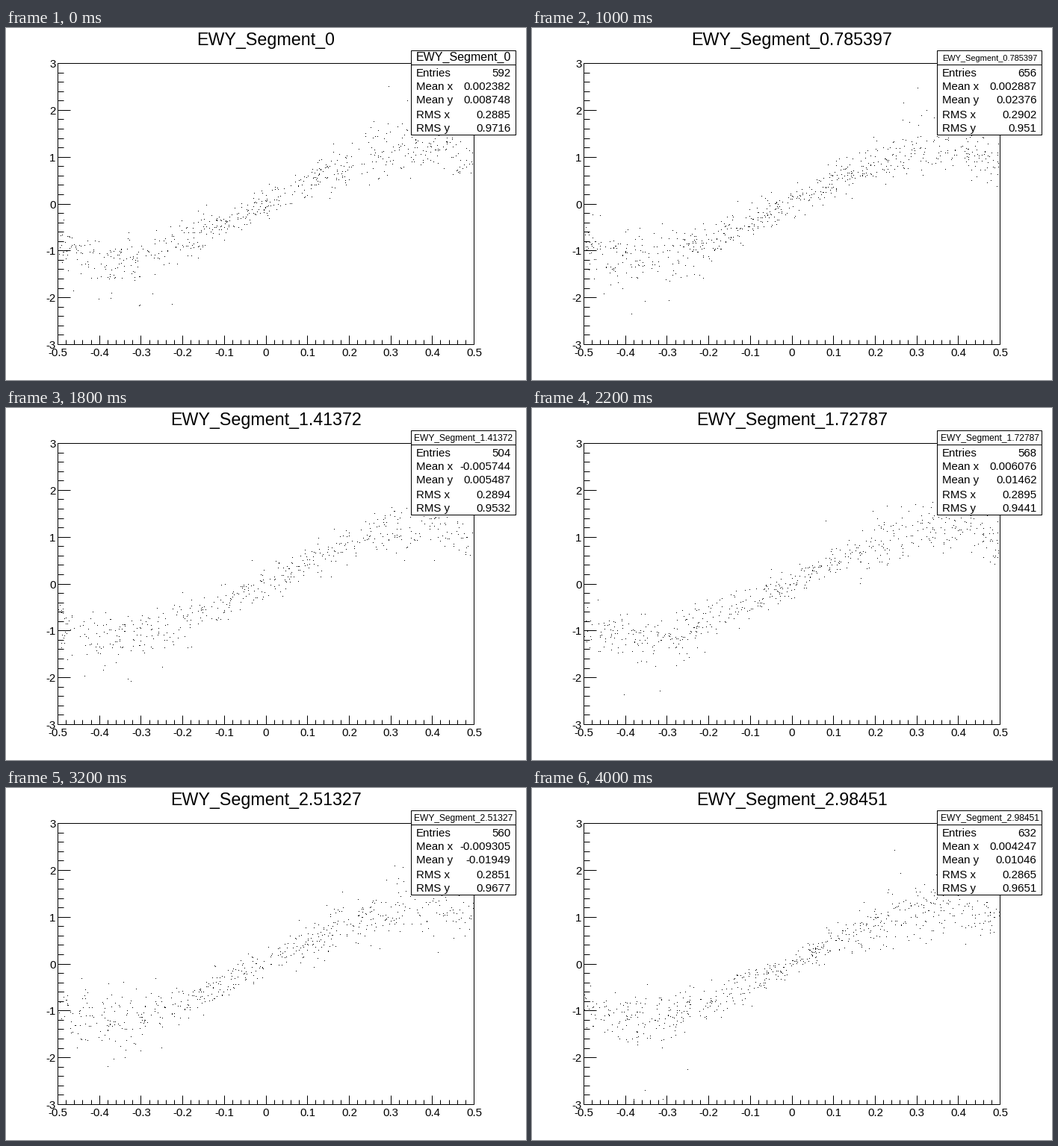
These frames come from a looping animation (696x472 px, 4.1 s). A matplotlib script:

```python
import matplotlib.pyplot as plt
import numpy as np
from matplotlib.animation import FuncAnimation
from matplotlib.patches import Rectangle

W, H, DPI = 696, 472, 64
PX = 72 / DPI  # points per pixel
LEFT, RIGHT, TOP, BOTTOM = 69, 626, 47, 424
SEGMENTS = 20
STEP = 3.14159 / SEGMENTS

plt.rcParams["font.family"] = "Liberation Sans"


def to_px(x, y):
    return (LEFT + (x + 0.5) * (RIGHT - LEFT),
            TOP + (3 - y) * (BOTTOM - TOP) / 6)


def make_segment(i):
    """Return the pixel positions of the dots and the five statistics."""
    rng = np.random.default_rng(40 + i)
    n = 8 * int(rng.integers(63, 84))
    # Nearly even phases, folded back into the plotted range
    x = np.mod((np.arange(n) + rng.normal(0, 40, n)) / n, 1) - 0.5
    curve = 4.2 * x - 3 * x**3 - 28 * x**5
    y = curve * np.exp(0.19 * rng.standard_t(6, n)) + rng.normal(0, 0.16, n)
    y = np.clip(y, -2.9, 2.9)
    moments = x.mean(), y.mean(), x.std(), y.std()
    px, py = np.round(to_px(x, y))
    return px, py, [str(n)] + [f"{v:.4g}" for v in moments]


segments = [make_segment(i) for i in range(SEGMENTS)]

fig = plt.figure(figsize=(W / DPI, H / DPI), dpi=DPI, facecolor="white")
ax = fig.add_axes([0, 0, 1, 1])
ax.set_xlim(0, W)
ax.set_ylim(H, 0)
ax.axis("off")


def label(x, y, text="", size=15, ha="left"):
    return ax.text(x, y, text, size=size * PX, ha=ha, va="baseline",
                   color="black", zorder=5)


def box(x0, y0, x1, y1, fill, z):
    ax.add_patch(Rectangle((x0, y0), x1 - x0, y1 - y0, facecolor=fill,
                           edgecolor="black", linewidth=PX, zorder=z))


def ticks():
    style = dict(colors="black", linewidth=PX, zorder=2)
    for k in range(51):
        x = to_px(-0.5 + k / 50, 0)[0]
        ax.vlines(x, BOTTOM - (6 if k % 5 else 12), BOTTOM, **style)
        if k % 5 == 0:
            label(x + 0.5, 440, f"{(k // 5 - 5) / 10:g}", ha="center")
    for k in range(31):
        y = to_px(0, -3 + k / 5)[1]
        ax.hlines(y, LEFT, LEFT + (8 if k % 5 else 17), **style)
        if k % 5 == 0:
            label(66.5, y + 6, str(k // 5 - 3), ha="right")


box(LEFT, TOP, RIGHT, BOTTOM, "none", 2)
ticks()
dots, = ax.plot([], [], ",", color="black", zorder=1)

box(542, 30, 682, 143, "white", 3)
ax.hlines(49, 542, 682, colors="black", linewidth=PX, zorder=4)
ROWS = [65, 83, 101, 121, 139]
names = [label(549, y, name) for name, y in
         zip(["Entries", "Mean x", "Mean y", "RMS x", "RMS y"], ROWS)]
values = [label(675.5, y, ha="right") for y in ROWS]
title = label(348, 23, size=23.2, ha="center")
box_title = label(612.5, 44, ha="center")


def draw(frame):
    i = min(frame // 2, SEGMENTS - 1)
    px, py, stats = segments[i]
    dots.set_data(px, py)
    name = f"EWY_Segment_{max(i * STEP - 1e-9, 0):g}"
    title.set_text(name)
    box_title.set_text(name)
    # Both parts of the box shrink their text to fit its width
    box_title.set_fontsize(min(16, round(228 / len(name))) * PX)
    row_size = 14 if max(map(len, stats)) > 9 else 15
    for artist, text in zip(values, stats):
        artist.set_text(text)
    for artist in names + values:
        artist.set_fontsize(row_size * PX)
    return [dots, title, box_title, *names, *values]


anim = FuncAnimation(fig, draw, frames=41, interval=100, repeat=True,
                     repeat_delay=0, blit=False)
plt.show()
```
